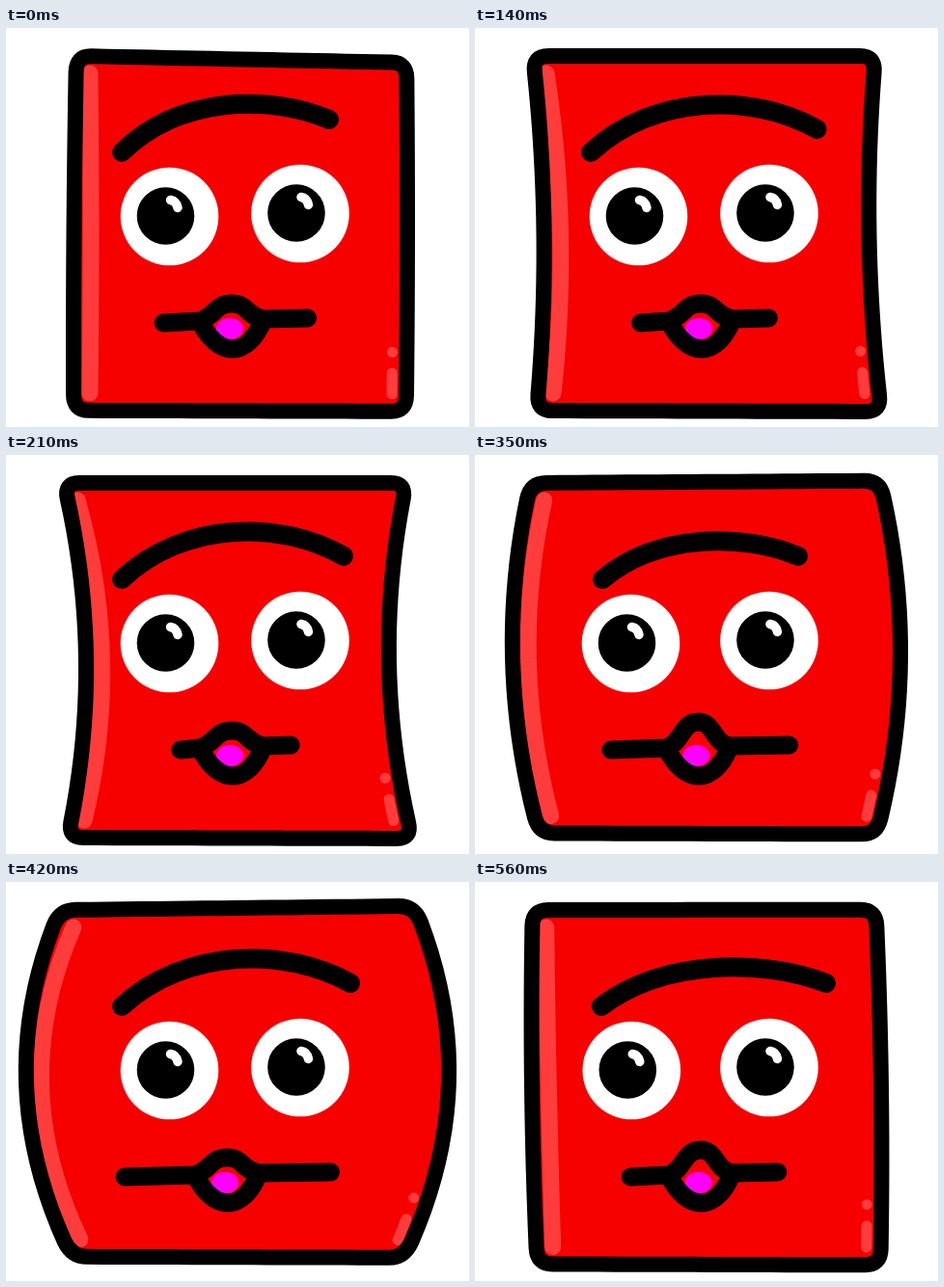
Recreate the animation shown at these times as an HTML page with a canvas. Size 480 by 414 pixels, loop 630 ms.

```html
<!DOCTYPE html>
<html lang="en">
<head>
<meta charset="utf-8">
<title>Squishy red block</title>
<style>
  html, body { margin: 0; width: 100%; height: 100%; overflow: hidden; background: #fff; }
  canvas { display: block; }
</style>
</head>
<body>
<canvas id="stage" width="480" height="414"></canvas>
<script>
const ctx = document.getElementById('stage').getContext('2d');
const STEP = 70, STEPS = 9;
const BLACK = '#000', RED = '#f60000', SHINE = '#ff3c3c';

// bow: sides bulge out (+) or pinch in (-); lean: left side moves in;
// drift: left eye slides left and the brow sinks; reach: right end of the brow
const keys = [
  { at: 0, bow: 1, lean: 1, drift: 0, reach: 335 },
  { at: 1, bow: 2, lean: 0, drift: 0, reach: 359 },
  { at: 3, bow: -21, lean: 0, drift: 0, reach: 350 },
  { at: 5, bow: 23, lean: 0, drift: 1, reach: 335 },
  { at: 6, bow: 41, lean: 0, drift: 0, reach: 357 },
  { at: 8, bow: 3, lean: 0, drift: 0.9, reach: 364 }
];

function poseAt(step) {
  const next = keys.find(key => key.at >= step);
  const prev = keys.findLast(key => key.at <= step);
  const t = next === prev ? 0 : (step - prev.at) / (next.at - prev.at);
  const mix = name => prev[name] + (next[name] - prev[name]) * t;
  const bow = mix('bow');
  return { bow, bulge: Math.max(0, bow), lean: mix('lean'), drift: mix('drift'), reach: mix('reach') };
}

function stroke(width, color, trace) {
  ctx.lineWidth = width;
  ctx.strokeStyle = color;
  ctx.beginPath();
  trace();
  ctx.stroke();
}

function disc(x, y, rx, color, ry = rx) {
  ctx.fillStyle = color;
  ctx.beginPath();
  ctx.ellipse(x, y, rx, ry, 0, 0, 2 * Math.PI);
  ctx.fill();
}

// Straight line from a to b, pushed sideways by a parabola that peaks at bow
const edge = ([ax, ay], [bx, by], bow = 0) => t =>
  [ax + (bx - ax) * t + 4 * bow * t * (1 - t), ay + (by - ay) * t];

function traceEdge(side, from, to) {
  for (let i = 0; i <= 20; i++) ctx.lineTo(...side(from + (to - from) * i / 20));
}

function drawBody({ bow, bulge, lean }) {
  const bottom = 398 - 0.2 * bulge;
  const tl = [60 + 13 * lean - 0.1 * bulge, 29];
  const tr = [415 + 0.2 * bulge, 29 + 7 * lean - 0.1 * bulge];
  const br = [421 - 6 * lean - 0.2 * bulge, bottom];
  const bl = [64 + 6 * lean + 0.1 * bulge, bottom - 1];
  const right = edge(tr, br, bow);
  const sides = [edge(tl, tr), right, edge(br, bl), edge(bl, tl, -bow)];

  const trace = () => {
    sides.forEach((side, i) => {
      traceEdge(side, 0.045, 0.955);
      const next = sides[(i + 1) % 4];
      ctx.quadraticCurveTo(...next(0), ...next(0.045));
    });
    ctx.closePath();
  };
  ctx.fillStyle = RED;
  ctx.beginPath();
  trace();
  ctx.fill();

  const strip = edge([tl[0] + 14, tl[1] + 18], [bl[0] + 17 - 0.2 * bulge, bl[1] - 18], 2 - 0.95 * bow);
  stroke(17, SHINE, () => traceEdge(strip, 0, 1));

  const glint = t => {
    const [x, y] = right(t);
    return [x - 15, y];
  };
  disc(...glint(0.83), 5.5, SHINE);
  stroke(11, SHINE, () => traceEdge(glint, 0.89, 0.95));
  stroke(16, BLACK, trace);
}

function drawEye(x, y) {
  const px = x - 4;
  disc(x, y, 50.8, '#fff');
  disc(px, y - 0.5, 29.8, BLACK);
  stroke(9.5, '#fff', () => {
    ctx.moveTo(px + 5, y - 17);
    ctx.quadraticCurveTo(px + 11, y - 16, px + 12.5, y - 9);
  });
}

function drawBrow({ drift, lean, reach }) {
  const x = 120 + 12 * drift, y = 129;
  const endY = 105 - 10 * lean;
  const peak = 80 + 10 * drift;
  const controlY = (peak - (y + endY) / 8) / 0.75;
  const pull = 0.28 * (reach - x);
  stroke(20, BLACK, () => {
    ctx.moveTo(x, y);
    ctx.bezierCurveTo(x + pull, controlY, reach - pull, controlY, reach, endY);
  });
}

function drawMouth({ bow, bulge, drift }) {
  const middle = 238 - 0.2 * bulge;
  const half = 74 + 0.8 * bow;
  const lip = 234 - 0.12 * bulge;
  const left = lip - 33, right = lip + 33;
  const top = 286 - 9 * drift;
  disc(lip - 2, 312, 14, '#f0f', 11);
  stroke(19, BLACK, () => {
    ctx.moveTo(middle - half, 306);
    ctx.lineTo(left, 304);
    ctx.bezierCurveTo(left + 16, 299, left + 16, top, lip, top);
    ctx.bezierCurveTo(right - 16, top, right - 18, 299, right, 302);
    ctx.bezierCurveTo(right - 16, 343, left + 19, 343, left, 304);
    ctx.moveTo(right, 302);
    ctx.lineTo(middle + half, 301);
  });
}

function draw(time) {
  const pose = poseAt(Math.floor(time / STEP) % STEPS);
  ctx.fillStyle = '#fff';
  ctx.fillRect(0, 0, 480, 414);
  drawBody(pose);
  drawEye(169.5 - 8 * pose.drift, 195.5);
  drawEye(305, 192.5);
  drawBrow(pose);
  drawMouth(pose);
}

ctx.lineCap = ctx.lineJoin = 'round';
const start = performance.now();
function tick() {
  draw(performance.now() - start);
  requestAnimationFrame(tick);
}
tick();
</script>
</body>
</html>
```
